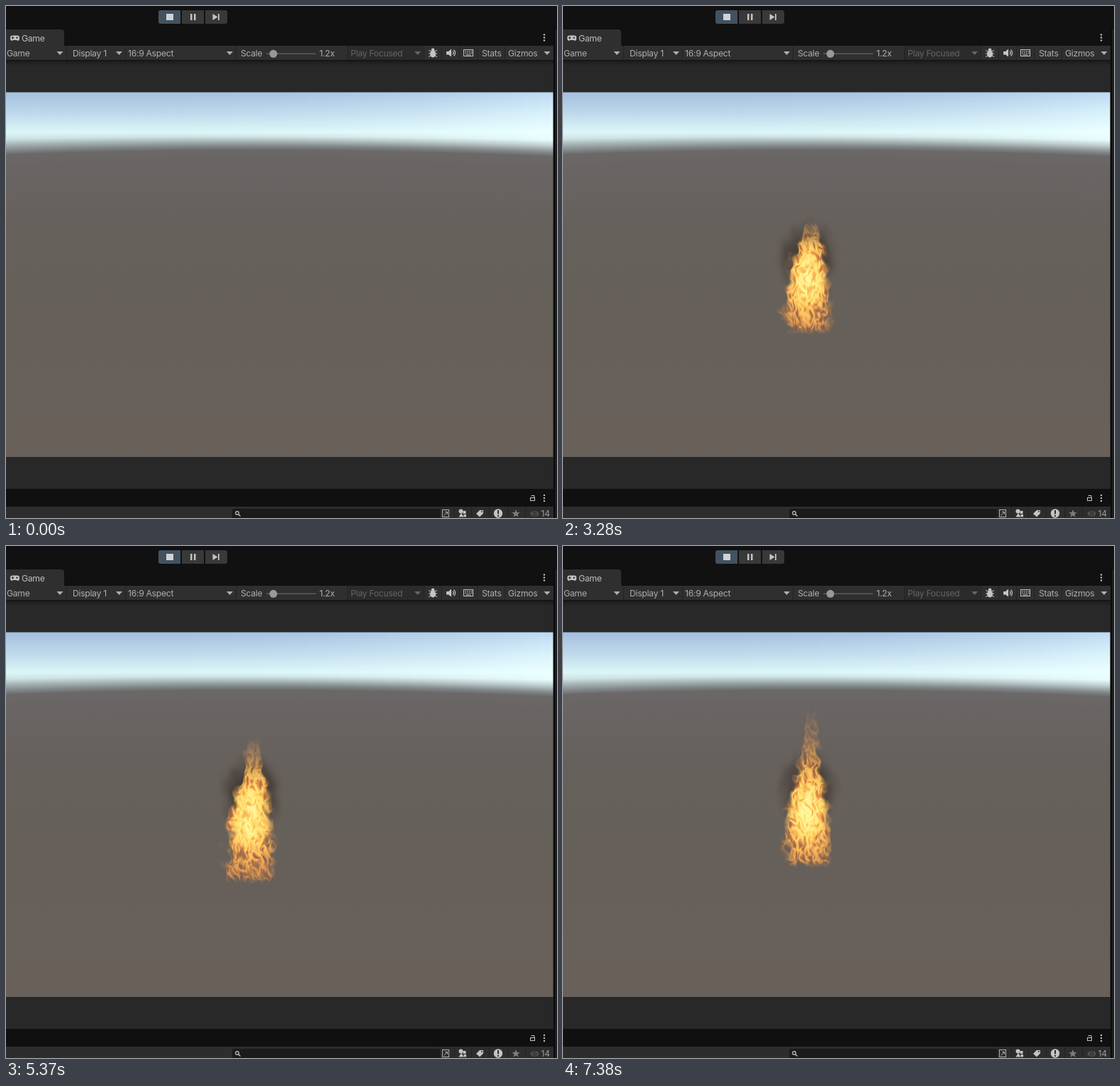
Recreate the animation shown at these times as an HTML page with a canvas. Size 777 by 721 pixels, loop 7420 ms.

```html
<!DOCTYPE html>
<html lang="en">
<head>
<meta charset="utf-8">
<title>Fire in the game view</title>
<style>
html, body { margin: 0; width: 100%; height: 100%; overflow: hidden; background: #111; }
canvas { position: absolute; display: block; left: 0; top: 0; }
#fire { left: 286px; top: 196px; }
</style>
</head>
<body>
<canvas id="stage" width="777" height="721"></canvas>
<canvas id="fire" width="112" height="296"></canvas>
<script>
const LOOP = 7420;
const g = document.getElementById('stage').getContext('2d');
const clamp = v => Math.min(1, Math.max(0, v));
const mix = (a, b, k) => a + (b - a) * k;
const smooth = (a, b, v) => { const k = clamp((v - a) / (b - a)); return k * k * (3 - 2 * k); };
const mixColor = (a, b, k) => a.map((v, i) => mix(v, b[i], k));

// ---------- editor window ----------
const LIGHT = '#c4c4c4', TEXT = '#aeaeae', BAR = '#2f2f2f', DIM = '#646464';

function box(x, y, w, h, color, r = 0) {
  g.fillStyle = color;
  g.beginPath();
  g.roundRect(x, y, w, h, r);
  g.fill();
}
function frameBox(x, y, w, h, color) {
  g.strokeStyle = color;
  g.lineWidth = 1;
  g.strokeRect(x, y, w, h);
}
function poly(color, ...p) {
  g.fillStyle = color;
  g.beginPath();
  for (let i = 0; i < p.length; i += 2) g.lineTo(p[i], p[i + 1]);
  g.closePath();
  g.fill();
}
function dot(x, y, rx, color, ry = rx) {
  g.fillStyle = color;
  g.beginPath();
  g.ellipse(x, y, rx, ry, 0, 0, 7);
  g.fill();
}
function line(color, w, ...p) {
  g.strokeStyle = color;
  g.lineWidth = w;
  g.beginPath();
  for (let i = 0; i < p.length; i += 2) g.lineTo(p[i], p[i + 1]);
  g.stroke();
}
function arc(x, y, r, from, to) {
  g.strokeStyle = LIGHT;
  g.lineWidth = 1.2;
  g.beginPath();
  g.arc(x, y, r, from, to);
  g.stroke();
}
function label(text, x, y, color = TEXT) {
  g.fillStyle = color;
  g.fillText(text, x, y);
}
const arrow = (x, color = TEXT) => poly(color, x - 4.5, 64, x + 4.5, 64, x, 69);
const kebab = (x, y) => [-4, 0, 4].forEach(d => dot(x, y + d, 1.2, '#c0c0c0'));

// Each column is one gradient, bent along the horizon and lit from the right.
function drawScene() {
  for (let x = 0; x < 772; x++) {
    const dip = 5.3e-5 * (x - 350) ** 2;
    const sun = 26 * clamp((x - 180) / 590) ** 2;
    const grad = g.createLinearGradient(0, 122, 0, 635);
    const stop = (y, r, gr, b) => grad.addColorStop((y - 122) / 513, `rgb(${r},${gr},${b})`);
    stop(122, 164 + sun, 192 + sun, 222 + sun * .8);
    stop(150, 190 + sun, 215 + sun, 235 + sun * .6);
    stop(178, 220 + sun * .6, 246 + sun * .4, 247 + sun * .4);
    stop(184 + dip * .5, 205 + sun, 226 + sun, 227 + sun);
    stop(190 + dip * .7, 168 + sun, 182 + sun, 183 + sun);
    stop(197 + dip, 130, 136, 137);
    stop(203 + dip, 107, 104, 104);
    stop(220 + dip, 105, 101, 100);
    stop(300, 103, 97, 93);
    stop(400, 102, 96, 90);
    stop(635, 105, 96, 90);
    box(x, 121.5, x < 771 ? 1 : .5, 513.5, grad);
  }
}

function drawToolbar() {
  box(0, 56, 772, 20, BAR);
  box(482, 56, 107, 20, '#2b2b2b');
  for (const x of [85, 168, 324, 481, 589, 614, 639, 664, 703]) box(x, 56, 1, 20, '#242424');
  label('Game', 1, 71);
  label('Display 1', 94, 71);
  label('16:9 Aspect', 172, 71);
  label('Scale', 331, 71);
  label('1.2x', 442, 71);
  label('Play Focused', 486, 71, DIM);
  label('Stats', 671, 71);
  label('Gizmos', 708, 71);
  [76, 159.5, 315.5, 763].forEach(x => arrow(x));
  arrow(580.5, DIM);
  box(367, 66.5, 70, 1.5, '#5c5c5c');
  dot(377, 67.3, 5.5, '#999');

  // bug
  dot(602, 67.5, 4, LIGHT, 5);
  dot(602, 62, 2.4, LIGHT);
  for (const s of [-1, 1]) for (const d of [-1, 0, 1])
    line(LIGHT, 1, 602, 67 + 2 * d, 602 + 6 * s, 67 + 4.5 * d);
  // speaker
  poly(LIGHT, 621, 64, 624, 64, 628, 60.5, 628, 71.5, 624, 68.5, 621, 68.5);
  arc(628, 66, 3, -.9, .9);
  arc(628, 66, 5.5, -.9, .9);
  // keyboard
  frameBox(645.5, 61.5, 13, 9, LIGHT);
  for (let i = 0; i < 8; i++) box(647.5 + i % 4 * 2.8, 63.3 + (i >> 2) * 2.5, 1.5, 1.3, LIGHT);
  box(648.5, 68.3, 7, 1, LIGHT);
}

function drawLowerPanel() {
  box(0, 680, 772, 25, '#101010');
  frameBox(739.5, 692.5, 6, 4, LIGHT);
  line(LIGHT, 1, 745, 692, 745, 689.5, 741, 689.5, 741, 690.5);
  kebab(759, 693);
  box(0, 705, 772, 16, '#2d2d2d');
  box(319, 708, 293, 13, '#1b1b1b', [3, 3, 0, 0]);
  arc(326, 714, 2.3, 0, 7);
  line(LIGHT, 1.3, 327.7, 715.7, 330.5, 718.5);
  for (const x of [612, 632, 656, 681, 707, 732]) box(x, 705, 1, 16, '#222');
  // open in window
  frameBox(615.5, 709.5, 9, 10, TEXT);
  line(TEXT, 1, 617.5, 717.5, 622.5, 712.5, 619, 712.5);
  line(TEXT, 1, 622.5, 712.5, 622.5, 716);
  // shapes, tag, notice
  dot(641.5, 711.5, 3, LIGHT);
  box(644.5, 711, 4, 4, LIGHT);
  poly(LIGHT, 642, 714, 645.5, 719.5, 638.5, 719.5);
  box(645.5, 716, 3.5, 3.5, LIGHT);
  poly(LIGHT, 663, 715, 668, 710, 673, 710, 673, 714.5, 668, 719.5);
  dot(671, 712, 1, '#2d2d2d');
  dot(694, 714.5, 6.2, LIGHT);
  box(693, 710, 2, 5.5, '#2d2d2d');
  box(693, 717, 2, 2, '#2d2d2d');
  const star = [];
  for (let i = 0; i < 10; i++) {
    const r = i % 2 ? 2.6 : 6, a = i * Math.PI / 5;
    star.push(719 + r * Math.sin(a), 715 - r * Math.cos(a));
  }
  poly('#7d7d7d', ...star);
  // eye
  dot(745.5, 715, 6, '#505050', 3.8);
  dot(745.5, 715, 2.8, '#2d2d2d');
  dot(745.5, 715, 1.5, '#505050');
  label('14', 754.5, 719, '#9c9c9c');
}

function drawEditor() {
  g.font = '12.2px Inter, Roboto, sans-serif';
  g.letterSpacing = '-0.3px';
  box(0, 0, 777, 721, '#111');
  const shade = g.createLinearGradient(0, 77, 0, 84);
  shade.addColorStop(0, '#1a1a1a');
  shade.addColorStop(1, '#282828');
  box(0, 77, 772, 603, shade);
  drawScene();
  box(772, 32, 2, 689, '#0b0b0b');
  box(774, 33, 3, 688, '#1c1c1c');

  // play controls
  box(215, 6, 31, 19, '#435261', [3, 0, 0, 3]);
  box(248, 6, 31, 19, '#393939');
  box(281, 6, 31, 19, '#393939', [0, 3, 3, 0]);
  box(226, 11, 10, 9, '#cfd3d6');
  box(260, 11, 2.5, 9, LIGHT);
  box(265, 11, 2.5, 9, LIGHT);
  poly(LIGHT, 291.5, 11, 298.5, 15.5, 291.5, 20);
  box(299, 11, 1.8, 9, LIGHT);

  // tab with gamepad
  box(0, 33, 82, 24, BAR, [0, 4, 0, 0]);
  box(6, 41.5, 13, 6.5, LIGHT, 3.2);
  dot(8.3, 46.8, 2.1, LIGHT);
  dot(16.7, 46.8, 2.1, LIGHT);
  line(BAR, 1.1, 7.5, 44.8, 11.5, 44.8);
  line(BAR, 1.1, 9.5, 42.8, 9.5, 46.8);
  dot(15.5, 44.8, 1.2, BAR);
  label('Game', 22, 49.5, '#bebebe');
  kebab(759, 44.5);

  drawToolbar();
  drawLowerPanel();
}

// ---------- fire ----------
const fire = document.getElementById('fire').getContext('2d');
const W = 112, H = 296, LEFT = 286, TOP = 196;
const image = fire.createImageData(W, H);

// The fire keeps growing; its foot swells downwards and settles again.
function poseAt(t) {
  const tip = 356 - .0166 * t + 7 * Math.sin(t / 210);
  const dense = Math.max(tip + 10, 318 + 52 * Math.exp(-t / 2600));
  const base = 448 + 25 * Math.sin(Math.PI * clamp((t - 2400) / 5200));
  return {
    tip, dense, base,
    coreY: mix(dense, base, .43),
    half: mix(25, 37, smooth(600, 4000, t)),
    tipX: 352 + 5 * Math.sin(t / 330),
    baseX: 344,
    smoke: .8 * smooth(1800, 4000, t) - .2 * smooth(4800, 6200, t),
    power: smooth(40, 420, t)
  };
}

const HEAT = [[166, 88, 52], [226, 128, 66], [249, 178, 86], [255, 224, 112], [255, 246, 158]];
function heatColor(h) {
  const p = clamp(h) * 3.999, i = p | 0;
  return mixColor(HEAT[i], HEAT[i + 1], p - i);
}

// Gradient noise, about 0 to 1
const COS = Array.from({ length: 256 }, (_, i) => Math.cos(i * Math.PI / 128));
function slope(i, j, dx, dy) {
  let h = Math.imul(i, 374761393) + Math.imul(j, 668265263);
  h = Math.imul(h ^ h >>> 13, 1274126177) >>> 24;
  return COS[h] * dx + COS[h + 64 & 255] * dy;
}
function noise(x, y) {
  const i = Math.floor(x), j = Math.floor(y), dx = x - i, dy = y - j;
  const u = smooth(0, 1, dx), v = smooth(0, 1, dy);
  const top = mix(slope(i, j, dx, dy), slope(i + 1, j, dx - 1, dy), u);
  const low = mix(slope(i, j + 1, dx, dy - 1), slope(i + 1, j + 1, dx - 1, dy - 1), u);
  return .5 + .75 * mix(top, low, v);
}
const ridge = v => 1 - Math.abs(2 * v - 1);

function drawFire(t) {
  const { tip, dense, base, coreY, half, tipX, baseX, smoke, power } = poseAt(t);
  const px = image.data;
  px.fill(0);
  if (t >= 70) for (let y = 0; y < H; y++) {
    const Y = y + TOP;
    if (Y < tip - 30 || Y > base + 8) continue;
    const rise = (Y - tip) / (dense - tip);
    const u = clamp((Y - dense) / (base - dense));
    const cx = mix(tipX, baseX, smooth(tip, coreY, Y));
    const w = half * (Y < dense ? .2 + .28 * clamp(rise) : (.48 + .6 * Math.sqrt(u)) * (1 - .18 * u ** 6));
    const solid = .35 + .65 * smooth(tip, dense + 12, Y);
    const coreH = Y < coreY ? (coreY - dense) * 1.05 : half * 1.15;
    for (let x = 0; x < W; x++) {
      const X = x + LEFT;
      const drift = noise(X / 17, (Y + t * .07) / 24);
      const curl = noise(X / 8 + 50, (Y + t * .08) / 12);
      const bx = X + (drift - .5) * 10 + (curl - .5) * 6;
      const by = Y + t * .09 + (curl - .5) * 10;
      const wide = noise(bx / 8 + 31, by / 14);
      const fine = noise(bx / 4.5 + 77, by / 9);
      const strand = smooth(.4, 1, .55 * ridge(wide) + .45 * ridge(fine));

      const edge = 1 - Math.abs(bx - cx) / w + (drift - .5) * .35 + (wide - .5) * .45;
      const body = smooth(-.08, .35, edge)
        * smooth(0, 12, base + 7 - 10 * fine - Y)
        * smooth(-.1, .35, rise + (wide - .5) * .3);
      const core = Math.exp(-(((X - cx) / (half * .68)) ** 2) - ((Y - coreY) / coreH) ** 2);
      const flame = power * body * solid * Math.min(1, .22 + .6 * strand + 1.1 * core);

      const r = Math.hypot((X - 345) / 52, (Y - dense - 24) / 66);
      const dark = smoke * smooth(.05, .7, 1 - r + (drift - .5) * .25);
      const alpha = flame + dark * (1 - flame);
      if (alpha < .004) continue;

      const hot = heatColor(.1 + .34 * strand + core * (.44 + .2 * strand));
      const color = mixColor(hot, [190, 148, 95], (1 - solid) * .9);
      const k = flame / alpha, o = (y * W + x) * 4;
      px[o] = mix(48, color[0], k);
      px[o + 1] = mix(37, color[1], k);
      px[o + 2] = mix(30, color[2], k);
      px[o + 3] = alpha * 255;
    }
  }
  fire.putImageData(image, 0, 0);
}

function frame() {
  drawFire(performance.now() % LOOP);
  requestAnimationFrame(frame);
}
drawEditor();
frame();
</script>
</body>
</html>
```
